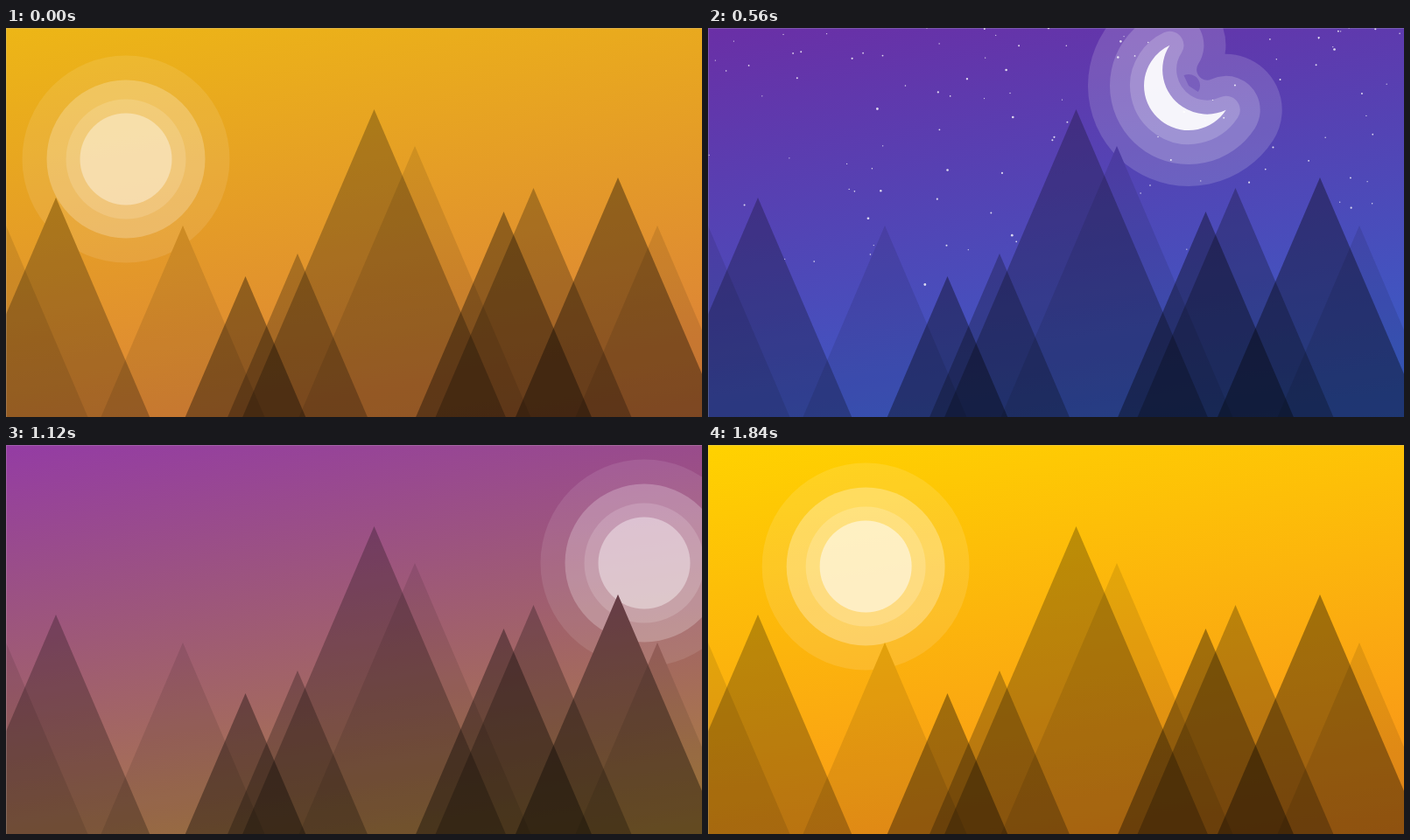
Animation of 795 by 445 pixels, one loop 1920 ms. Source, as an HTML page with a canvas:

```html
<!DOCTYPE html>
<html lang="en">
<head>
<meta charset="utf-8">
<title>Day and night over the hills</title>
<style>
html, body { margin: 0; width: 100%; height: 100%; overflow: hidden; }
canvas { display: block; }
</style>
</head>
<body>
<canvas id="stage" width="795" height="445"></canvas>
<script>
const W = 795, H = 445, LOOP = 1920, STEP = 80;
const ctx = document.getElementById('stage').getContext('2d');

// Time, colour at the top left, colour at the bottom right
const SKY = [
  [0, 'edb616', 'da7c3c'],
  [240, 'b0506c', '8a50b0'],
  [560, '6a2fa6', '3460c8'],
  [880, '2858b0', '0090a0'],
  [1120, '943ca4', 'ac8238'],
  [1520, 'ff7452', 'ff8c18'],
  [1840, 'ffd200', 'f88e1c']
].map(([t, a, b]) => [t, ...rgb(a), ...rgb(b)]);
SKY.push([LOOP, ...SKY[0].slice(1)]);

// Each row of trees: darkness, then the tops
const ROWS = [
  [0.1, [0, 226], [202, 226], [467, 135], [744, 226]],
  [0.26, [57, 194], [420.5, 93], [333, 258], [602.5, 183]],
  [0.36, [273.5, 284], [568.5, 210], [699, 171]]
];
const SPREAD = 0.427;

const MOON_R = 51, BITE = 28;
const SUN_RINGS = [[118.5, 0.15], [90.5, 0.46], [68.5, 0.62], [52.5, 0.97]];
const MOON_RINGS = [[64, 0.15], [39, 0.3], [16, 0.43], [0, 0.95]];

const rand = seeded(7);
const STARS = Array.from({ length: 120 }, () => ({
  x: rand() * W,
  y: 300 * rand() ** 1.5,
  r: 0.6 + 0.8 * rand() ** 2
}));

function seeded(s) {
  return () => (s = s * 16807 % 2147483647) / 2147483647;
}

function rgb(hex) {
  return [0, 2, 4].map(i => parseInt(hex.slice(i, i + 2), 16));
}

// Rises from 0 to 1 and back between two times
function glow(t, from, to) {
  const p = (t - from) / (to - from);
  return p > 0 && p < 1 ? Math.sqrt(Math.sin(Math.PI * p)) : 0;
}

// Paints nested layers so that each one ends at its own total opacity
function layers(rings, fade, paint) {
  let below = 0;
  ctx.fillStyle = ctx.strokeStyle = '#fff';
  for (const [size, opacity] of rings) {
    const total = opacity * fade;
    ctx.globalAlpha = 1 - (1 - total) / (1 - below);
    paint(size);
    below = total;
  }
  ctx.globalAlpha = 1;
}

function disc(x, y, r) {
  ctx.beginPath();
  ctx.arc(x, y, r, 0, Math.PI * 2);
  ctx.fill();
}

function drawSky(t) {
  const i = SKY.findIndex(key => key[0] > t) - 1;
  const [a, b] = [SKY[i], SKY[i + 1]];
  const u = (t - a[0]) / (b[0] - a[0]);
  const c = a.map((v, k) => Math.round(v + (b[k] - v) * u));
  const g = ctx.createLinearGradient(0, 0, 90, 559);
  g.addColorStop(0, `rgb(${c.slice(1, 4)})`);
  g.addColorStop(1, `rgb(${c.slice(4)})`);
  ctx.fillStyle = g;
  ctx.fillRect(0, 0, W, H);
}

function drawSun(t) {
  const fade = glow(t, 960, 2070);
  const u = (t - 1520) / 400;
  const x = 330 - 223 * u + 103 * u ** 2 - 73 * u ** 3;
  const y = 98 + 30 * u + 44.5 * u ** 2 - 22.5 * u ** 3;
  if (fade) layers(SUN_RINGS, fade, r => disc(x, y, r));
}

function drawMoon(t, fade) {
  const u = (t - 560) / 320;
  const horn = Math.acos(BITE / 2 / MOON_R);
  ctx.save();
  ctx.translate(549 - 285 * u - 86 * u ** 2, 66 - 16.5 * u + 54.5 * u ** 2);
  ctx.rotate(-0.715);
  ctx.beginPath();
  ctx.arc(0, 0, MOON_R, horn, -horn);
  ctx.arc(BITE, 0, MOON_R, horn - Math.PI, Math.PI - horn, true);
  ctx.closePath();
  ctx.lineJoin = 'round';
  layers(MOON_RINGS, fade, r => {
    ctx.lineWidth = r * 2;
    if (r) ctx.stroke();
    else ctx.fill();
  });
  ctx.restore();
}

function drawStars(fade) {
  ctx.fillStyle = '#fff';
  ctx.globalAlpha = 0.8 * fade;
  STARS.forEach(s => disc(s.x, s.y, s.r));
  ctx.globalAlpha = 1;
}

function addTree([x, y]) {
  const half = (H - y) * SPREAD;
  ctx.moveTo(x, y);
  ctx.lineTo(x + half, H);
  ctx.lineTo(x - half, H);
  ctx.closePath();
}

// Trees hide the sun, moon and stars but tint the sky
function drawTrees(t) {
  ctx.save();
  ctx.beginPath();
  ROWS.forEach(([, ...tops]) => tops.forEach(addTree));
  ctx.clip();
  drawSky(t);
  ctx.restore();
  for (const [dark, ...tops] of ROWS) {
    ctx.fillStyle = `rgba(0,0,0,${dark})`;
    for (const top of tops) {
      ctx.beginPath();
      addTree(top);
      ctx.fill();
    }
  }
}

function draw(t) {
  const night = glow(t, 90, 1090);
  drawSky(t);
  drawSun(t < LOOP / 2 ? t + LOOP : t);
  if (night) {
    drawMoon(t, night);
    drawStars(night);
  }
  drawTrees(t);
  ctx.fillStyle = 'rgba(190,190,190,0.25)';
  ctx.fillRect(0, 0, W, 1);
  ctx.fillRect(0, 1, 1, H);
}

const start = performance.now();
function tick() {
  const t = (performance.now() - start) % LOOP;
  draw(Math.floor(t / STEP) * STEP);
  requestAnimationFrame(tick);
}
tick();
</script>
</body>
</html>
```
